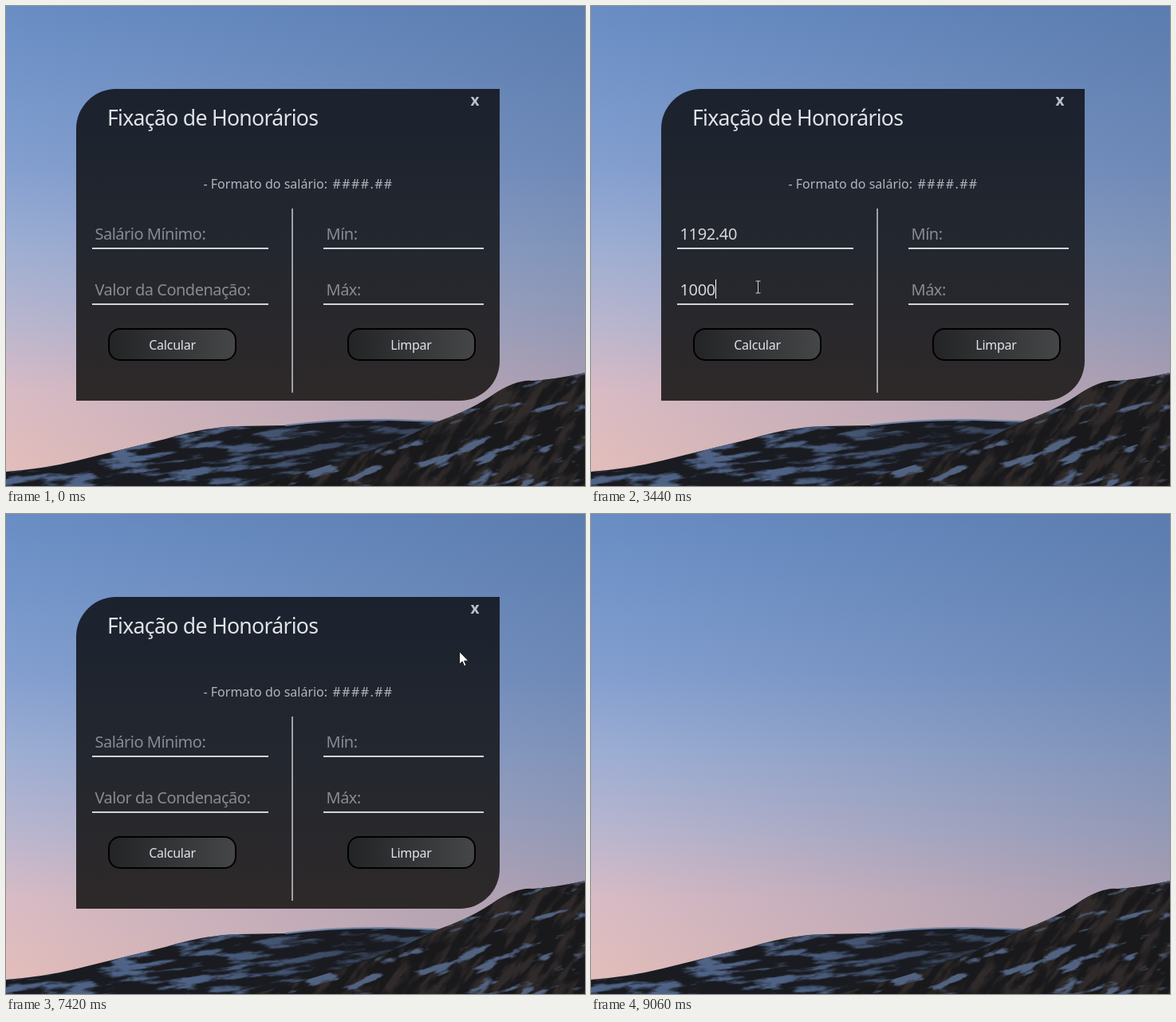
Recreate the animation shown at these times as an HTML page. Size 726x602 px, loop 9920 ms.

```html
<!DOCTYPE html>
<html lang="pt">
<head>
<meta charset="utf-8">
<title>Fixação de Honorários</title>
<style>
html, body { margin: 0; width: 100%; height: 100%; overflow: hidden; background: #688dc4; }
svg { position: absolute; left: 0; top: 0; width: 100%; height: 100%; will-change: transform; }
text { font: 20px "Noto Sans", "Open Sans", sans-serif; white-space: pre; }
.title { font-size: 26.67px; letter-spacing: -.73px; fill: #e0e2e6; }
.note { font-size: 16px; fill: #b3b5bd; }
.field { letter-spacing: -.35px; fill: #d6d6d8; }
.field.empty { letter-spacing: -.5px; fill: #898a91; }
.button rect { fill: url(#rest); stroke: #000; stroke-width: 2; }
.button text { font-size: 16px; letter-spacing: -.25px; fill: #dfe3ee; text-anchor: middle; }
.button.over rect { fill: url(#over); }
.button.down rect { fill: #25272a; }
.close { font-size: 19px; font-weight: 700; fill: #bfc0c8; text-anchor: middle; }
.close.over { fill: #f4f4f6; }
.rules { stroke: #d2d3d6; stroke-width: 2; }
.outline { stroke: #15171b; }
</style>
</head>
<body>
<svg viewBox="0 0 726 602" preserveAspectRatio="none">
  <defs>
    <linearGradient id="sky" x1="0" y1="0" x2="0" y2="1">
      <stop offset="0" stop-color="#688dc4"/>
      <stop offset=".33" stop-color="#839fd0"/>
      <stop offset=".5" stop-color="#9daed3"/>
      <stop offset=".66" stop-color="#b9b6cf"/>
      <stop offset=".8" stop-color="#d8bbc5"/>
      <stop offset=".95" stop-color="#e2bdbb"/>
    </linearGradient>
    <linearGradient id="shade">
      <stop offset="0" stop-color="#3c557d" stop-opacity="0"/>
      <stop offset="1" stop-color="#3c557d" stop-opacity=".3"/>
    </linearGradient>
    <linearGradient id="thin">
      <stop offset="0"/><stop offset=".35"/><stop offset=".65" stop-opacity=".6"/>
    </linearGradient>
    <clipPath id="farClip"><path id="farHill" d="M0 584Q50 580 90 570T200 543Q250 528 290 527L350 526Q410 518 480 519L542 521 600 602H0Z"/></clipPath>
    <clipPath id="nearClip"><path id="nearHill" d="M310 602Q420 575 500 541L542 521Q580 508 610 488T660 470Q690 468 726 460V602Z"/></clipPath>

    <!-- Stretched noise, cut to hard-edged streaks -->
    <filter id="snow" x="0" y="0" width="1" height="1" color-interpolation-filters="sRGB">
      <feTurbulence type="fractalNoise" baseFrequency=".016 .09" numOctaves="5" seed="7"/>
      <feColorMatrix values="0 0 0 0 .31  0 0 0 0 .39  0 0 0 0 .53  0 0 0 7 -3.5"/>
      <feComposite operator="in" in2="SourceGraphic"/>
    </filter>
    <filter id="patches" x="0" y="0" width="1" height="1" color-interpolation-filters="sRGB">
      <feTurbulence type="fractalNoise" baseFrequency=".02 .07" numOctaves="5" seed="3"/>
      <feColorMatrix values="0 0 0 0 .32  0 0 0 0 .39  0 0 0 0 .51  0 0 0 9 -5.4"/>
    </filter>
    <filter id="rock" x="0" y="0" width="1" height="1" color-interpolation-filters="sRGB">
      <feTurbulence type="fractalNoise" baseFrequency=".02 .07" numOctaves="4" seed="5"/>
      <feColorMatrix values="0 0 0 0 .19  0 0 0 0 .17  0 0 0 0 .165  0 0 0 5 -2.3"/>
    </filter>
  </defs>

  <rect width="726" height="602" fill="url(#sky)"/>
  <rect width="726" height="602" fill="url(#shade)"/>

  <use href="#farHill" fill="#191b21"/>
  <g clip-path="url(#farClip)">
    <rect x="-80" y="520" width="700" height="180" fill="url(#thin)" filter="url(#snow)" transform="rotate(-6)"/>
  </g>
  <path d="M350 526Q410 518 480 519L542 521" fill="none" stroke="#6d82a5" stroke-width="2"/>

  <use href="#nearHill" fill="#19191c"/>
  <g clip-path="url(#nearClip)">
    <rect x="-250" y="-200" width="500" height="400" filter="url(#rock)" transform="translate(560 540) rotate(-52)"/>
    <rect x="-300" y="-160" width="600" height="320" filter="url(#patches)" transform="translate(560 540) rotate(-18)"/>
  </g>
</svg>

<svg viewBox="0 0 726 602" preserveAspectRatio="none">
  <defs>
    <linearGradient id="panel" x1="0" y1="0" x2="0" y2="1">
      <stop offset="0" stop-color="#1b222e"/>
      <stop offset=".5" stop-color="#23272f"/>
      <stop offset="1" stop-color="#2e2929"/>
    </linearGradient>
    <linearGradient id="rest">
      <stop offset="0" stop-color="#222426"/><stop offset="1" stop-color="#454647"/>
    </linearGradient>
    <linearGradient id="over">
      <stop offset="0" stop-color="#454647"/><stop offset="1" stop-color="#222426"/>
    </linearGradient>
    <path id="palm" d="M.2 2.200V14M3.500 9V14M6.500 9.800V14M9 11.300V14M-3.200 13L1.500 20.800H8L9 14H0Z"/>
    <path id="bar" d="M-.5-7H5.500M2.500-7V8M-.5 8H5.500"/>
  </defs>

  <g id="window">
    <path d="M88 154A50 50 0 0 1 138 104H619V445A50 50 0 0 1 569 495H88Z" fill="url(#panel)"/>
    <text class="title" x="127" y="150">Fixação de Honorários</text>
    <text class="note" x="247.500" y="229">- Formato do salário: <tspan x="409.500" letter-spacing="1.4">####.##</tspan></text>
    <text class="close" id="close" x="588" y="125">x</text>
    <path class="rules" d="M108 304H329M108 374H329M398 304H599M398 374H599"/>
    <path d="M359 254V485" stroke="#a0a1a7" stroke-width="2"/>
    <text class="field" x="111.500" y="293"></text>
    <text class="field" x="111.500" y="363"></text>
    <text class="field" x="401.500" y="293"></text>
    <text class="field" x="401.500" y="363"></text>
    <path id="caret" d="M0 0V24" stroke="#fff"/>
    <g class="button"><rect x="129" y="405" width="159" height="39" rx="14"/><text x="208.500" y="431">Calcular</text></g>
    <g class="button"><rect x="429" y="405" width="159" height="39" rx="14"/><text x="508" y="431">Limpar</text></g>
  </g>

  <g id="pointer">
    <circle id="ring" r="15" fill="#ff0" fill-opacity=".5"/>
    <path id="arrow" d="M.5 .5V16.500L4.200 13 6.700 18.700 9 17.700 6.600 12.200H11.800Z" fill="#fff" stroke="#111" stroke-width=".9"/>
    <g id="hand" stroke-linecap="round" stroke-linejoin="round">
      <use href="#palm" class="outline" stroke-width="4.400"/>
      <use href="#palm" fill="#fff" stroke="#fff" stroke-width="2.800"/>
    </g>
    <g id="beam">
      <use href="#bar" class="outline" stroke-width="2.600" opacity=".6"/>
      <use href="#bar" stroke="#d8d8da"/>
    </g>
  </g>
</svg>

<script>
const LOOP = 9920, HOLD = 110;
const $ = id => document.getElementById(id);
const all = sel => [...document.querySelectorAll(sel)];

const presses = [880, 2060, 5180, 6810, 8050];
const [focusWage, focusSum, calculate, clear, quit] = presses;
const paste = 1300;
const keys = [2380, 2900, 3170, 3440, 3950, 4270, 4580];

// Each move: start, end, x, y
const moves = [
  [80, 560, 251, 282],
  [1650, 1870, 207, 352],
  [4720, 5000, 208, 429],
  [5510, 6110, 498, 431],
  [6480, 6580, 492, 430],
  [7020, 7420, 568, 172],
  [7420, 7960, 592, 117],
  [8320, 9060, 675, 604]
];
const labels = ['Salário Mínimo:', 'Valor da Condenação:', 'Mín:', 'Máx:'];
const fields = all('.field'), buttons = all('.button');

const ease = p => p * p * (3 - 2 * p);
const between = (v, a, b) => v >= a && v < b;
const show = (el, on) => el.setAttribute('visibility', on ? 'visible' : 'hidden');

function pointerAt(t) {
  let x = 626, y = 578;
  for (const [start, end, tx, ty] of moves) {
    if (t < start) break;
    const k = ease(Math.min(1, (t - start) / (end - start)));
    x += (tx - x) * k;
    y += (ty - y) * k;
  }
  return [x, y];
}

function drawFields(t) {
  const typed = keys.filter(k => t >= k).length;
  const solved = t >= calculate + HOLD;
  const values = t >= clear + HOLD ? [] : [
    t >= paste && '1192.40',
    '1000000'.slice(0, typed),
    solved && 'R$:84769.6',
    solved && 'R$:123848.0'
  ];
  fields.forEach((field, i) => {
    field.textContent = values[i] || labels[i];
    field.classList.toggle('empty', !values[i]);
  });

  const inWage = t < focusSum;
  const advance = inWage ? (t >= paste ? 72 : 0) : 11 * typed;
  $('caret').setAttribute('transform', `translate(${112.5 + advance} ${inWage ? 273 : 343})`);
  show($('caret'), between(t, focusWage, calculate));
}

function draw(t) {
  const [x, y] = pointerAt(t);
  const open = t < quit + HOLD;
  const seen = between(t, 80, 9060);
  const down = presses.some(p => between(t, p, p + HOLD));
  const inside = (left, top, w, h) =>
    open && seen && between(x, left, left + w) && between(y, top, top + h);

  drawFields(t);
  const hovered = buttons.map((button, i) => {
    const over = inside(128 + 300 * i, 404, 161, 41);
    button.classList.toggle('over', over);
    button.classList.toggle('down', over && down);
    return over;
  });
  const onClose = inside(580, 110, 17, 20);
  $('close').classList.toggle('over', onClose);

  const onField = [265, 335].some(top => inside(108, top, 221, 40) || inside(398, top, 201, 40));
  const kind = onClose || hovered.includes(true) ? 'hand' : onField ? 'beam' : 'arrow';
  for (const id of ['arrow', 'hand', 'beam']) show($(id), seen && id === kind);
  show($('ring'), down);
  $('pointer').setAttribute('transform', `translate(${Math.round(x)} ${Math.round(y)})`);
  $('window').style.display = open ? '' : 'none';
}

function tick() {
  draw(performance.now() % LOOP);
  requestAnimationFrame(tick);
}
tick();
</script>
</body>
</html>
```
